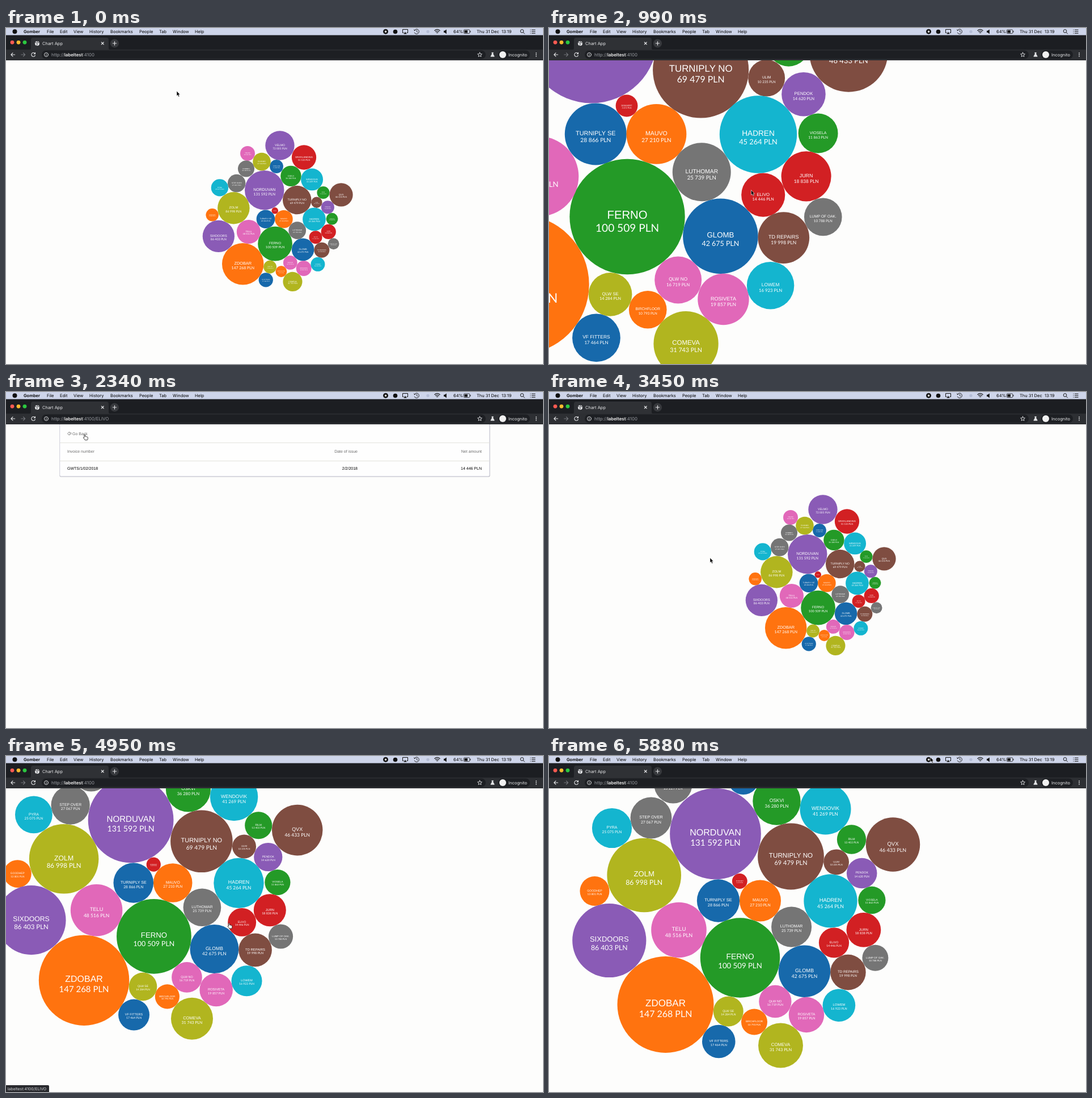
Recreate the animation shown at these times as an HTML page. Size 947 by 592 pixels, loop 5910 ms.

```html
<!DOCTYPE html>
<html lang="en">
<head>
<meta charset="utf-8">
<title>Bubble chart</title>
<style>
  html, body { margin: 0; height: 100%; overflow: hidden; background: #fdfdfc; }
  svg { display: block; width: 100vw; height: 100vh; text-rendering: geometricPrecision; }
  text { white-space: pre; }
  .ui { font: 7.5px Inter, "Open Sans", sans-serif; }
  .bold { font-weight: 600; }
  .name { font-family: "Liberation Sans", Arial, sans-serif; }
  .sum { font-family: Lato, "Open Sans", sans-serif; }
  #cloud { fill: #fff; text-anchor: middle; }
  #detail { font: 7px "Liberation Sans", Arial, sans-serif; }
  #url { font-size: 7.9px; }
  #link { font-size: 7px; }
  .end { text-anchor: end; }
  .line { fill: none; stroke-linecap: round; stroke-linejoin: round; }
</style>
</head>
<body>
<svg viewBox="0 0 947 592">
  <rect width="947" height="592" fill="#fdfdfc"/>
  <g id="cloud"></g>

  <g id="detail">
    <rect x="94.5" y="50" width="759" height="99.6" rx="2" fill="#b4b4bb"/>
    <rect x="95" y="50" width="757.6" height="98.4" rx="2" fill="#fefefe" stroke="#dcdcea" stroke-width=".7"/>
    <path d="M95 89.5H853M95 121.5H853" stroke="#e3e3dc"/>
    <path class="line" d="M108.6 73l3-2.8v1.6h3.2v2.4h-3.2v1.6z" stroke="#666" stroke-width=".7"/>
    <g fill="#6c6c6c">
      <text x="117" y="75.5">Go Back</text>
      <text x="108" y="107.3">Invoice number</text>
      <text class="end" x="620" y="107.3">Date of issue</text>
      <text class="end" x="839" y="107.3">Net amount</text>
    </g>
    <text x="108" y="137">GWTS/1/02/2018</text>
    <text class="end" x="620" y="137">2/2/2018</text>
    <text class="end" x="839" y="137">14 446 PLN</text>
  </g>

  <g id="status" class="ui">
    <path d="M0 580H74q2 0 2 2V592H0z" fill="#292a2e"/>
    <text id="link" x="2.5" y="588.5" fill="#d4d6da"></text>
  </g>

  <!-- menu bar -->
  <rect width="947" height="13" fill="#ced5ea"/>
  <circle cx="15.5" cy="6.3" r="4" fill="#111"/>
  <g id="menu" class="ui"></g>
  <g fill="none" stroke="#111">
    <circle cx="669.5" cy="6.3" r="4" fill="#111"/>
    <rect x="668" y="4.8" width="3" height="3" fill="#fff" stroke="none"/>
    <circle cx="686.5" cy="6.5" r="3.8" fill="#111" stroke="none"/>
    <path d="M701.5 8.5h-2v-6h9v6h-2"/><path d="M701.3 10.5l2.7-3.4 2.7 3.4z" fill="#111" stroke="none"/>
    <path d="M720.5 4.2a4.2 4.2 0 1 1-.3 3.6M724.5 3.8v2.7l1.8 1.3M719.6 2.6l.7 2 2-.6" stroke-width=".9"/>
    <circle cx="744" cy="6.3" r="2.6" fill="#b5bdd6" stroke="none"/>
    <path d="M755.5 4.8q5-4.2 10 0M757.2 6.8q3.3-2.6 6.6 0M759 8.6q1.5-1 3 0" stroke-width="1.2"/>
    <path d="M772 4.8h1.8l3-2.4v8l-3-2.4H772z" fill="#111" stroke="none"/>
    <rect x="807.2" y="3" width="10.6" height="6.6" rx="1.4" stroke-width=".8"/>
    <path d="M808.5 4.2h5.4v4.2h-5.4zM818.4 5h1v2.6h-1z" fill="#111" stroke="none"/>
    <circle cx="910" cy="5.5" r="2.8"/><path d="M912.2 7.7l2.6 2.7"/>
    <path d="M924.5 3.3h1M924.5 6.3h1M924.5 9.3h1M927 3.3h6.5M927 6.3h6.5M927 9.3h6.5"/>
  </g>

  <!-- browser window -->
  <rect y="12.6" width="947" height="26.4" fill="#1c1e22"/>
  <path d="M40 39q4 0 4-4V21q0-4 4-4H177q4 0 4 4V35q0 4 4 4z" fill="#2f3135"/>
  <rect y="38" width="947" height="19" fill="#2d2f33"/>
  <rect x="63" y="39.5" width="783" height="15" rx="7.5" fill="#1d1f23"/>
  <circle cx="11" cy="25.3" r="3.4" fill="#fb5a52"/>
  <circle cx="22" cy="25.3" r="3.4" fill="#fcbb2e"/>
  <circle cx="33" cy="25.3" r="3.4" fill="#2bc840"/>
  <circle cx="55" cy="27.3" r="4" fill="#e6e7e9"/>
  <path d="M51.8 25.6l2.4.6 1.2 1.6-1.2 2.5M55.2 23.6l.4 1.8 2.6.6" class="line" stroke="#2f3135"/>
  <circle cx="191.5" cy="27" r="7.6" fill="#37393d"/>
  <g class="line" stroke="#e6e7e9" stroke-width="1.1">
    <path d="M168.3 25l4 4m0-4l-4 4M188.3 27h6.4M191.5 23.8v6.4"/>
    <path d="M15.7 47H9M12 43.9L8.9 47l3.1 3.1"/>
    <path d="M26.8 47h6.7M30.5 43.9l3.1 3.1-3.1 3.1" stroke="#74777c"/>
    <path d="M51.2 45.2a3.4 3.4 0 1 0 .2 3M51.5 43.4v2.3h-2.3"/>
    <g stroke-width=".9">
      <circle cx="71" cy="47" r="3.5"/><path d="M71 46.9v1.8M71 45.2v.1"/>
      <path d="M835.5 43.1l1.1 2.6 2.8.2-2.1 1.9.6 2.7-2.4-1.4-2.4 1.4.6-2.7-2.1-1.9 2.8-.2z"/>
    </g>
    <path d="M856.7 43.5h2.6M857.1 43.8v2.1l-2.3 4.3h6.4l-2.3-4.3v-2.1z" fill="#e6e7e9" stroke-width=".8"/>
  </g>
  <rect x="868" y="39.6" width="56" height="14.8" rx="7.4" fill="#1d1f23"/>
  <circle cx="876" cy="47" r="6" fill="#f1f1f1"/>
  <g fill="#e6e7e9">
    <circle cx="935" cy="44.2" r=".9"/><circle cx="935" cy="47" r=".9"/><circle cx="935" cy="49.8" r=".9"/>
    <text class="ui" x="64" y="30">Chart App</text>
    <text class="ui" x="886" y="49.8">Incognito</text>
  </g>
  <text id="url" class="ui" x="80" y="50" fill="#9a9da3">http://<tspan class="bold" fill="#f2f2f2">labeltest</tspan>:4100<tspan id="path"></tspan></text>

  <path id="arrow" d="M0 0V8.7L1.9 7l1.4 3.2 1.6-.7L3.5 6.4H6z" stroke="#fff" stroke-width=".6"/>
  <path id="hand" d="M-1.6 .4q0-1 .9-1t.9 1V3l.5-.2q.9-.3 1.3.4 1.1-.3 1.5.5 1.3-.1 1.3 1V6.4q0 1.2-.9 2.7H-.3Q-.8 7.7-2.7 5.8q-.7-.9 0-1.3.5-.3 1.1.4z" fill="#fff" stroke="#111" stroke-width=".8"/>
</svg>
<script>
const $ = id => document.getElementById(id);
const LOOP = 5910, HOST = "labeltest:4100", PICK = "/ELIVO";

// name, amount, x, y; the area of a bubble follows its amount
const groups = {
  "#1769ab": [["COPE LINE", 15400, 342.7, 40.5], ["TURNIPLY SE", 28866, 298.5, 255],
    ["GLOMB", 42675, 450.5, 379.2], ["VF FITTERS", 17464, 299.3, 502.9]],
  "#ff730f": [["MAUVO", 27210, 372.5, 255], ["GOODHEP", 13801, 80.5, 238],
    ["ZDOBAR", 147268, 205.5, 438], ["BIRCHFLOOR", 10793, 362, 468.6]],
  "#249a27": [["OSKVI", 36280, 401.5, 79.5], ["RILM", 13403, 533.5, 147],
    ["VIOSELA", 11863, 569.4, 254], ["FERNO", 100509, 337, 355.5]],
  "#d22023": [["GRAYLANDING", 51133, 454.9, 3.5], ["JURN", 18838, 554.9, 306.4],
    ["ELIVO", 14446, 502.5, 329], ["DOMVERT", 3672, 336.3, 220.5]],
  "#8a5bb6": [["VELMO", 72005, 356.5, -45.1], ["NORDUVAN", 131592, 293.5, 137],
    ["PENDOK", 14620, 551.7, 206.5], ["SIXDOORS", 86403, 106.3, 325]],
  "#7f4d41": [["TURNIPLY NO", 69479, 426.5, 177], ["QVX", 46433, 606.5, 156],
    ["ULIM", 10235, 506.6, 186.8], ["TD REPAIRS", 19998, 527.4, 381.1]],
  "#e168b9": [["TRUDDI", 18344, 224.7, -12.7], ["TELU", 48516, 229, 306.5],
    ["QLW NO", 16719, 398.9, 432.5], ["ROSIVETA", 19857, 454, 456]],
  "#757575": [["HOBBEN", 23229, 218.9, 49.7], ["STEP OVER", 27067, 180, 109],
    ["LUMP OF OAK.", 10788, 575.4, 355.8], ["LUTHOMAR", 25739, 427.6, 301.1]],
  "#b1b51f": [["DUVAMO", 27132, 282.5, 20.8], ["ZOLM", 86998, 167.7, 210],
    ["QLW SE", 14284, 316.3, 450], ["COMEVA", 31743, 408.5, 510]],
  "#14b5cf": [["PYRA", 25075, 111, 127], ["WENDOVIK", 41269, 487.5, 93.5],
    ["HADREN", 45264, 496.5, 255.4], ["LOWEM", 16923, 511.4, 439.2]],
};

const money = n => String(n).replace(/(\d{3})$/, " $1") + " PLN";

function bubble([name, amount, x, y], color) {
  const r = 0.2215 * Math.sqrt(amount);
  return `<circle cx="${x}" cy="${y}" r="${r}" fill="${color}"/>
    <text class="name" x="${x}" y="${y + 0.037 * r}" font-size="${0.2 * r}">${name}</text>
    <text class="sum" x="${x}" y="${y + 0.262 * r}" font-size="${0.188 * r}">${money(amount)}</text>`;
}

$("cloud").innerHTML = Object.entries(groups)
  .flatMap(([color, list]) => list.map(b => bubble(b, color))).join("");

const menu = [["Gomber", 31], ["File", 72], ["Edit", 95], ["View", 119], ["History", 147],
  ["Bookmarks", 184], ["People", 235], ["Tab", 270], ["Window", 294], ["Help", 333],
  ["64%", 789], ["Thu 31 Dec  13:19", 830]];
$("menu").innerHTML = menu.map(([word, x], i) =>
  `<text x="${x}" y="9" ${i ? "" : 'class="bold"'}>${word}</text>`).join("");

// time, scale, dx, dy
const home = [0.4322, 328.9, 226.5], close = [2.298, -815.5, -482.2], middle = [0.938, -55.2, -15.7];
const camera = [
  [0, ...home], [300, ...home], [990, 1.446, -348.8, -181.6], [1300, ...close], [2300, ...close],
  [2301, ...home], [3950, ...home], [4750, ...middle], [5100, ...middle], [5500, 1, 0, 0], [LOOP, 1, 0, 0],
];
// time, x, y: the pointer goes to one bubble and follows it while zooming
const pointer = [
  [0, 301, 111], [300, 538, 365], [990, 356.5, 285.5], [1120, 345, 280], [1350, 885, 417],
  [1700, 340, 276], [1930, 340, 276], [2310, 139.5, 75.5], [2800, 139.5, 75.5], [3300, 284, 292],
  [3550, 284, 292], [3900, 538, 367], [4750, 394, 295], [5100, 394, 295],
  [5500, 560, 200], [5760, 672.5, 2], [LOOP, 672.5, 2],
];

function track(keys, t, ease) {
  const i = Math.max(1, keys.findIndex(k => k[0] > t));
  const [a, b] = [keys[i - 1], keys[i]];
  const u = ease((t - a[0]) / (b[0] - a[0]), a, b);
  return a.slice(1).map((v, j) => v + (b[j + 1] - v) * u);
}

const smooth = s => s * s * (3 - 2 * s);
// constant zoom rate about a fixed point
function zoom(s, a, b) {
  const ratio = b[1] / a[1];
  return ratio === 1 ? s : (ratio ** s - 1) / (ratio - 1);
}
const within = (t, from, to) => t >= from && t < to;
const show = (id, on) => $(id).setAttribute("visibility", on ? "visible" : "hidden");

function draw(t) {
  const [k, dx, dy] = track(camera, t, zoom);
  const [x, y] = track(pointer, t, smooth);
  const detail = within(t, 1900, 2750);
  const overBubble = within(t, 1670, 1900) || within(t, 3880, 5150);
  const overBack = within(t, 2290, 2750);
  const hand = overBubble || overBack;

  $("cloud").setAttribute("transform", `translate(${dx} ${dy}) scale(${k})`);
  for (const id of ["arrow", "hand"]) $(id).setAttribute("transform", `translate(${x} ${y})`);
  show("cloud", !detail);
  show("detail", detail);
  show("status", overBubble || within(t, 2420, 2750));
  show("arrow", !hand);
  show("hand", hand);
  $("link").textContent = HOST + (detail ? "" : PICK);
  $("path").textContent = detail ? PICK : "";
}

const start = performance.now();
function tick() {
  draw((performance.now() - start) % LOOP);
  requestAnimationFrame(tick);
}
tick();
</script>
</body>
</html>
```
